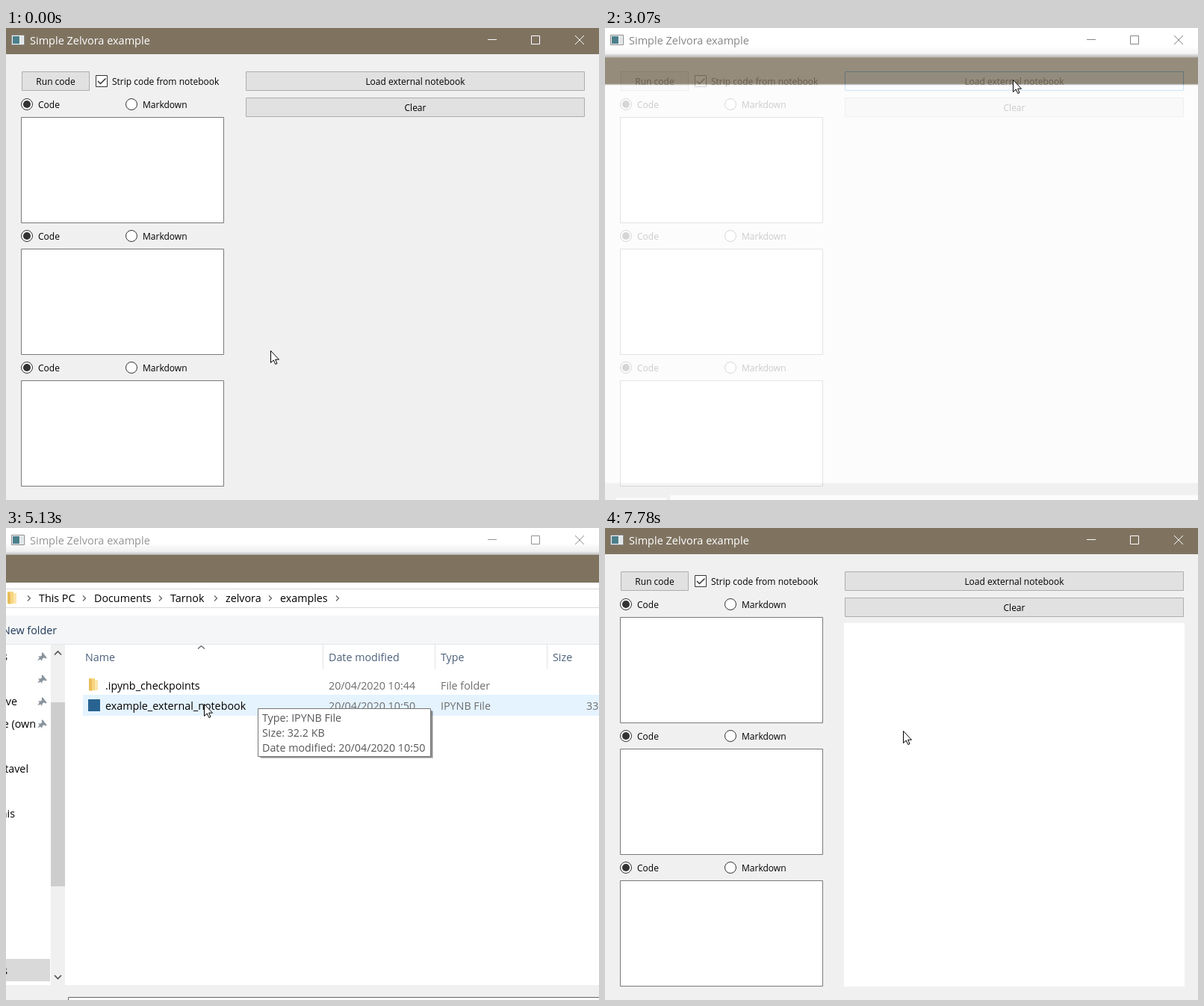
Animation of 794 by 631 pixels, one loop 8 s. Source, as an HTML page:

```html
<!DOCTYPE html>
<html lang="en">
<head>
<meta charset="utf-8">
<title>Notebook loader</title>
<style>
html, body { margin: 0; width: 100%; height: 100%; overflow: hidden; background: #f0f0f0; }
svg { display: block; width: 794px; height: 631px; font: 12px "Open Sans", "Noto Sans", sans-serif; }
.big { font-size: 14.3px; }
.line { fill: none; stroke: currentColor; }
.btn { fill: #e1e1e1; stroke: #adadad; }
.mid { text-anchor: middle; }
.end { text-anchor: end; }
.grey { fill: #6d6d6d; }
.head { fill: #4c607a; }
.chev { fill: none; stroke: #606060; stroke-width: 1.2; }

/* One shared 8 s clock: 1% = 80 ms. State changes are hard cuts. */
.bar, .caption, .load, .dialog, .content, .row1, .row2, .tip, .field, .view, .cursor {
  animation: 8s step-end infinite;
}
.bar { animation-name: bar; }
.caption { animation-name: caption; }
.load { animation-name: load; }
.dialog { animation-name: dialog; transform-origin: 490px 350px; }
.content { animation-name: content; }
.row1 { animation-name: row1; }
.row2 { animation-name: row2; }
.tip { animation-name: tip; }
.field { animation-name: field; }
.view { animation-name: view; }
.cursor { animation-name: cursor; }

@keyframes bar {
  0%, 100% { fill: #7f7360; }
  33.625% { fill: #fff; }
  82.375% { fill: #7f7360; }
}
@keyframes caption {
  0%, 100% { color: #fff; }
  33.625% { color: #858585; }
  42.375% { color: #949494; }
  81% { color: #6a6a6a; }
  82.375% { color: #fff; }
}
@keyframes load {
  0%, 100% { fill: #e1e1e1; stroke: #adadad; }
  17.75% { fill: #e1e1e1; stroke: #adadad; animation-timing-function: steps(4, end); }
  21% { fill: #e5f1fb; stroke: #0078d7; }
  31.25% { fill: #cce4f7; stroke: #005499; }
  32.5% { fill: #e5f1fb; stroke: #0078d7; }
  42.375% { fill: #e1e1e1; stroke: #adadad; }
}
@keyframes dialog {
  0%, 100% { opacity: 0; transform: scale(.95); }
  36.75% { opacity: .25; transform: scale(.96); }
  37.5% { opacity: .55; transform: scale(.98); }
  38.375% { opacity: .8; transform: scale(.99); }
  39.25% { opacity: .95; transform: scale(.997); }
  40% { opacity: 1; transform: none; }
  80.125% { opacity: .7; transform: scale(.988); }
  81% { opacity: .3; transform: scale(.967); }
  81.875% { opacity: 0; transform: scale(.95); }
}
@keyframes content { 0%, 100% { opacity: 0; } 40.75% { opacity: 1; } }
@keyframes row1 { 0%, 100% { opacity: 0; } 49.25% { opacity: 1; } 50.8125% { opacity: 0; } }
@keyframes row2 {
  0%, 100% { fill: #fff; }
  50.8125% { fill: #e5f3ff; }
  76.375% { fill: #cce8ff; }
}
@keyframes tip { 0%, 100% { opacity: 0; } 53.125% { opacity: 1; } 76.375% { opacity: 0; } }
@keyframes field {
  0%, 100% { stroke: #fff; }
  40.75% { stroke: #666; }
  76.375% { stroke: #4a9ae0; }
}
@keyframes view { 0%, 100% { opacity: 0; } 82.375% { opacity: 1; } }
@keyframes cursor {
  0%, 100% { transform: translate(354px, 431px); }
  8.1875% { transform: translate(354px, 431px); animation-timing-function: steps(7, end); }
  13.875% { transform: translate(446px, 240px); animation-timing-function: steps(3, end); }
  16.3125% { transform: translate(508px, 92px); animation-timing-function: steps(4, end); }
  19.5% { transform: translate(525px, 66px); animation-timing-function: steps(6, end); }
  24.25% { transform: translate(546px, 69px); }
  44.75% { transform: translate(546px, 69px); animation-timing-function: steps(5, end); }
  48.5% { transform: translate(420px, 195px); animation-timing-function: steps(3, end); }
  50.8125% { transform: translate(337px, 226px); animation-timing-function: steps(6, end); }
  55.375% { transform: translate(284px, 239px); animation-timing-function: steps(5, end); }
  59.25% { transform: translate(257px, 239px); }
  60% { transform: translate(257px, 239px); animation-timing-function: steps(2, end); }
  62% { transform: translate(273px, 237px); animation-timing-function: steps(2, end); }
  64.125% { transform: translate(265px, 235px); }
  88% { transform: translate(265px, 235px); animation-timing-function: steps(12, end); }
  97.25% { transform: translate(399px, 271px); }
}
</style>
</head>
<body>
<svg viewBox="0 0 794 631">
  <defs>
    <g id="cell">
      <circle cx="28" cy="102" r="7.5" fill="#fff" stroke="#333"/>
      <circle cx="28" cy="102" r="5" fill="#333"/>
      <text x="43" y="107">Code</text>
      <circle cx="168" cy="102" r="7.5" fill="#fff" stroke="#333"/>
      <text x="183" y="107">Markdown</text>
      <path d="M20.500 119.500h271v141h-271z" fill="#fff" stroke="#7a7a7a"/>
    </g>
    <path id="next" class="chev" d="M-2 -3.500 1.500 0 -2 3.500"/>
    <g id="folder">
      <path d="M0 0H8V16H0Z" fill="#f7d57e"/>
      <path d="M8 2H12V16H8Z" fill="#fbe5a9"/>
      <path d="M0 0 4 2V17L0 16Z" fill="#e9bd5c"/>
    </g>
    <path id="pin" d="M-1 -6 6 1 4 2 2 1 0 3V6L-2 4 -6 6 -4 2 -6 0H-3L-1 -2 -2 -4Z" transform="translate(49 0) rotate(8)" fill="#8a949e"/>
    <linearGradient id="shade" x2="0" y2="1">
      <stop stop-opacity="0"/>
      <stop offset=".7" stop-opacity=".06"/>
      <stop offset="1" stop-opacity=".26"/>
    </linearGradient>
  </defs>

  <rect width="794" height="631" fill="#f0f0f0"/>
  <rect class="bar" width="794" height="35"/>
  <path d="M7.500 9.500h17v13h-17z" fill="#f4f4f4" stroke="#8b8b8b"/>
  <path d="M9 11h9v10H9z" fill="#4c7f8c"/>
  <path d="M19 11h4v10h-4z" fill="#dfe5e8"/>
  <g class="caption">
    <text x="32" y="22" font-size="14.5" fill="currentColor">Simple Zelvora example</text>
    <path class="line" d="M645 15.500h12M703.500 10.500h11v11h-11zM762 10l12 12M774 10l-12 12"/>
  </g>

  <path class="btn" d="M21.500 58.500h90v25h-90z"/>
  <text class="mid" x="66.500" y="76">Run code</text>
  <path d="M120.500 63.500h15v15h-15z" fill="#fff" stroke="#333"/>
  <path d="M123 71l3.500 3.500 7-7" fill="none" stroke="#333" stroke-width="1.500"/>
  <text x="142" y="76">Strip code from notebook</text>
  <path class="btn load" d="M321.500 58.500h453v25h-453z"/>
  <text class="mid" x="548" y="76">Load external notebook</text>
  <path class="btn" d="M321.500 93.500h453v25h-453z"/>
  <text class="mid" x="548" y="111">Clear</text>
  <use href="#cell"/>
  <use href="#cell" y="176"/>
  <use href="#cell" y="352"/>
  <rect class="view" x="320" y="127" width="456" height="486" fill="#fff"/>

  <g class="dialog big">
    <rect x="-120" y="20" width="1220" height="16" fill="url(#shade)"/>
    <rect x="-120" y="36" width="1220" height="37" fill="#7f7360"/>
    <rect x="-120" y="73" width="1220" height="538" fill="#fff"/>
    <rect x="-120" y="611" width="1220" height="69" fill="#f0f0f0"/>
    <rect x="10" y="631" width="68" height="20" fill="#fff"/>
    <path class="field" d="M83.500 627.500h900v26h-900z" fill="#fff"/>

    <g class="content">
      <rect x="0" y="629" width="83" height="26" fill="#f0f0f0"/>
      <text x="9" y="647" class="grey">File name:</text>
      <text x="88" y="647">example_external_notebook</text>

      <path d="M-120 81.500h1220M-120 106.500h1220" stroke="#d9d9d9"/>
      <use href="#folder" x="2" y="85"/>
      <use href="#next" x="31" y="94"/>
      <text x="44" y="99">This PC</text>
      <use href="#next" x="105" y="94"/>
      <text x="118" y="99">Documents</text>
      <use href="#next" x="207" y="94"/>
      <text x="220" y="99">Tarnok</text>
      <use href="#next" x="281" y="94"/>
      <text x="294" y="99">zelvora</text>
      <use href="#next" x="354" y="94"/>
      <text x="367" y="99">examples</text>
      <use href="#next" x="444" y="94"/>

      <rect x="-120" y="117" width="1220" height="38" fill="#f5f6f7"/>
      <path d="M-120 155.500h1220" stroke="#e6e8ea"/>
      <text class="end" x="68" y="142" fill="#1e395b">New folder</text>

      <rect x="-120" y="576" width="179" height="30" fill="#d9d9d9"/>
      <g class="end">
        <text x="2" y="177">Documents</text>
        <text x="15" y="237">Bluecave</text>
        <text x="40" y="267">Bluecave (own</text>
        <text x="-11" y="297">Pictures</text>
        <text x="30" y="327">nortavel</text>
        <text x="12" y="387">old_this</text>
        <text x="-1" y="537">Projects</text>
        <text x="2" y="597">Documents</text>
      </g>
      <use href="#pin" y="172"/>
      <use href="#pin" y="202"/>
      <use href="#pin" y="232"/>
      <use href="#pin" y="262"/>
      <rect x="60" y="156" width="19" height="455" fill="#f0f0f0"/>
      <rect x="60" y="233" width="19" height="246" fill="#cdcdcd"/>
      <path d="M65 169.500l4.500-4.500 4.500 4.500M65 598l4.500 4.500 4.500-4.500" fill="none" stroke="#505050" stroke-width="1.600"/>

      <path d="M424.500 156v32M574.500 156v32M724.500 156v32" stroke="#e2e2e2"/>
      <path class="chev" d="M257 161.500l4.500-4 4.500 4"/>
      <g class="head">
        <text x="106" y="178">Name</text>
        <text x="432" y="178">Date modified</text>
        <text x="582" y="178">Type</text>
        <text x="732" y="178">Size</text>
      </g>
      <rect class="row1" x="103" y="196" width="760" height="27" fill="#e5f3ff"/>
      <rect class="row2" x="103" y="223" width="760" height="28"/>
      <use href="#folder" x="111" y="201"/>
      <rect x="110" y="229" width="16" height="16" fill="#286391"/>
      <text x="133" y="216">.ipynb_checkpoints</text>
      <text x="133" y="243">example_external_notebook</text>
      <g class="grey">
        <text x="432" y="216">20/04/2020 10:44</text>
        <text x="582" y="216">File folder</text>
        <text x="432" y="243">20/04/2020 10:50</text>
        <text x="582" y="243">IPYNB File</text>
        <text x="777" y="243">33 KB</text>
      </g>
    </g>
  </g>

  <g class="tip big">
    <path d="M341 245h231v63H341z" fill="#000" opacity=".2"/>
    <path d="M340 244h231v63H340z" fill="#000" opacity=".3"/>
    <path d="M337.500 241.500h231v64h-231z" fill="#fff" stroke="#767676"/>
    <g fill="#575757">
      <text x="343" y="259">Type: IPYNB File</text>
      <text x="343" y="279">Size: 32.2 KB</text>
      <text x="343" y="299">Date modified: 20/04/2020 10:50</text>
    </g>
  </g>

  <path class="cursor" d="M.5 .5V16.500L4.200 13 6.800 18.500 9 17.500 6.600 12.200H11.500Z" fill="#fff" stroke="#000"/>
</svg>
</body>
</html>
```
